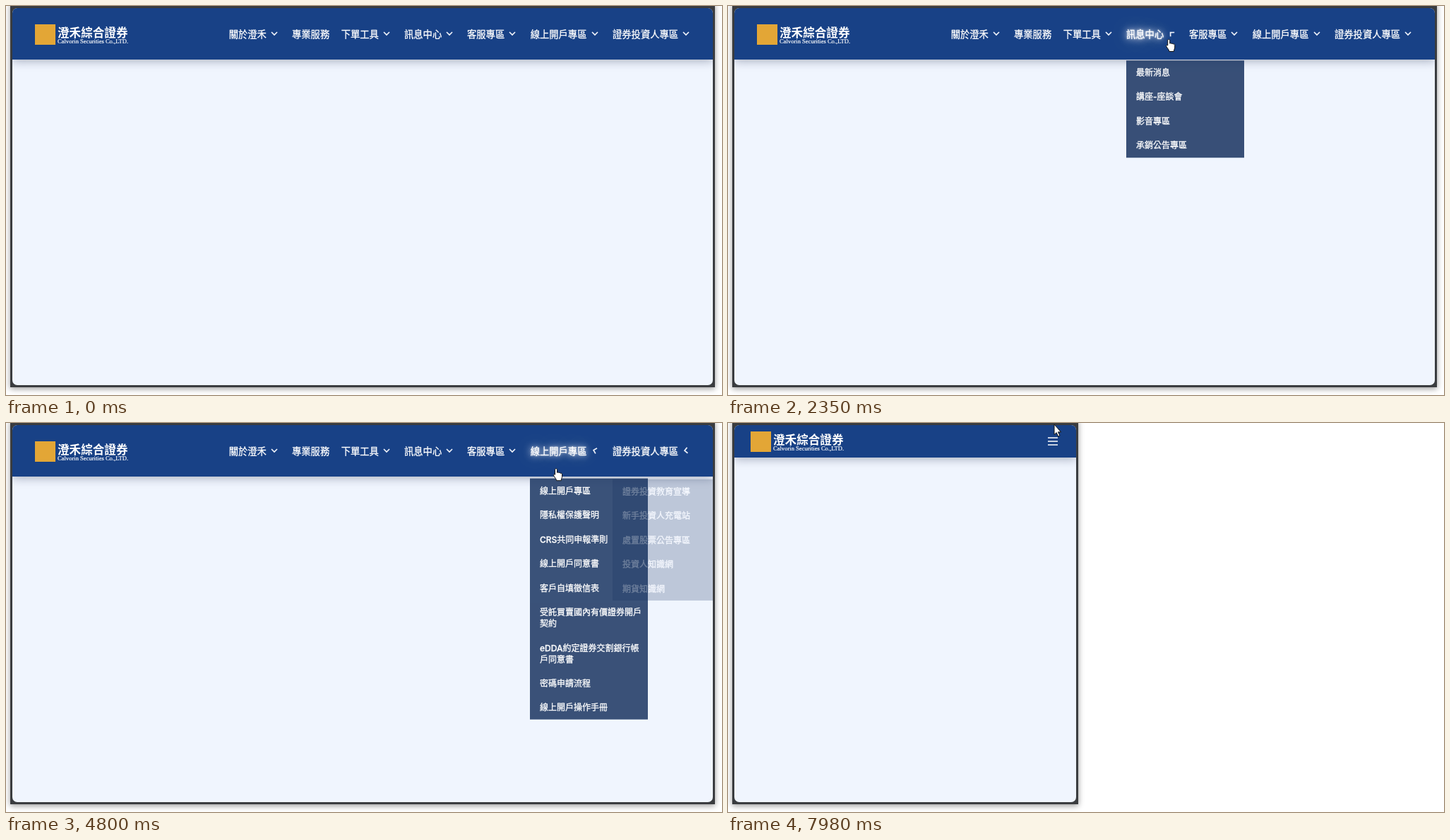
Write an HTML page that moves like this. It is 1014 by 552 pixels and loops after 8 s.

```html
<!DOCTYPE html>
<html lang="zh-Hant">
<head>
<meta charset="utf-8">
<title>導覽列</title>
<style>
html, body { margin: 0; width: 100%; height: 100%; overflow: hidden; background: #fff; }
body { position: relative; color: #fff; font-family: Inter, "Noto Sans CJK TC", "Noto Sans CJK JP", "Noto Sans CJK", sans-serif; }
#frame { position: absolute; left: 6px; top: -4px; height: 545px; background: #3a3c3f; box-shadow: 0 2px 8px rgba(0,0,0,.42); }
#page { position: absolute; left: 3px; right: 3px; top: 7px; height: 535px; border-radius: 7px; overflow: hidden; background: #f0f5fe; }
header { position: absolute; left: 0; right: 0; top: 0; height: 73px; background: #184186; box-shadow: 0 3px 12px rgba(20,30,60,.3); }
#logo { position: absolute; left: 32px; top: 23px; white-space: nowrap; }
#logo i { position: absolute; width: 29px; height: 29px; background: #e3a636; }
#logo b { position: absolute; left: 32px; top: 2px; font-size: 16.6px; line-height: 20px; font-weight: 900; }
#logo span { position: absolute; left: 32px; top: 18px; font: 8.56px/12px "Liberation Serif", serif; -webkit-text-stroke: .2px #fff; }
nav { position: absolute; right: 0; top: 0; width: 992px; height: 73px; }
.top { position: absolute; top: 27px; font-size: 13.3px; line-height: 20px; font-weight: 500; white-space: nowrap; -webkit-text-stroke: .3px #fff; }
.glow { text-shadow:
  0 0 3px rgb(255 255 255 / calc(.8 * var(--g, 0))),
  0 0 8px rgb(255 255 255 / calc(.9 * var(--g, 0))),
  0 0 14px rgb(255 255 255 / calc(.8 * var(--g, 0))),
  0 0 36px rgb(255 255 255 / calc(.6 * var(--g, 0))); }
.chev { position: absolute; top: 30px; width: 12px; height: 12px; }
.chev path { fill: none; stroke: #eef2fa; stroke-width: 1.7; }
.menu { position: absolute; top: 73px; width: 167px; background: rgba(24,51,96,.85); }
.row { padding: 9.93px 0 8.53px 14px; font-size: 12px; line-height: 16px; font-weight: 500; white-space: nowrap; -webkit-text-stroke: .3px #fff;
  background: rgb(24 64 135 / calc(.55 * var(--g, 0))); }
#burger { position: absolute; right: 26px; top: 17px; width: 14px; height: 12px; }
#burger path { stroke: #fff; stroke-width: 1.7; }
#cursor { position: absolute; left: 0; top: 0; width: 1px; height: 1px; overflow: visible; }
#cursor path { stroke-linejoin: round; }
</style>
</head>
<body>
<div id="frame"><div id="page">
  <header>
    <div id="logo"><i></i><b>澄禾綜合證券</b><span>Calvorin Securities Co.,LTD.</span></div>
    <nav></nav>
    <svg id="burger" viewBox="0 0 14 12"><path d="M0 1H14M0 6H14M0 11H14"/></svg>
  </header>
</div></div>
<svg id="cursor">
  <path id="hand" fill="#fff" stroke="#111" stroke-width="1" d="M2.5 9V2C2.5 0 5.5 0 5.5 2V6.2C6.3 5.5 7.5 5.6 7.9 6.5C8.7 6 9.8 6.2 10.2 7.1C11.2 6.7 12.5 7.2 12.5 8.5V12C12.5 13.5 11.2 14.5 11.2 17.5H4.6C4.6 15.5 2 13 .6 10.3C0 9 1.4 8 2.5 9Z" transform="translate(-4 0)"/>
  <path id="arrow" fill="#fff" stroke="#111" stroke-width="1" d="M0 0V14.5L3.2 11.6L5.6 17L7.9 16L5.5 10.8H9.6Z"/>
  <path id="resize" fill="#111" stroke="#fff" stroke-width=".7" d="M-7.5 0l4-3.8v2.9h7v-2.9l4 3.8l-4 3.8v-2.9h-7v2.9z"/>
</svg>
<script>
const LOOP = 8000, FADE = 300, HEADER = 76;
const $ = id => document.getElementById(id);
const clamp = v => Math.min(1, Math.max(0, v));
const smooth = v => (v = clamp(v), v * v * (3 - 2 * v));

// label, left edge, opening time, closing time, menu rows
const items = [
  ['關於澄禾', 315.7, 270, 1560, '公司簡介 組織架構 服務據點 資通安全 隱私權政策 發言人與檢舉信箱 永續發展專區 公司治理專區 投資人專區 金融友善服務專區 機構投資人盡職治理專區 風險管理專區 防制洗錢打擊資恐專區 股務代理機構'],
  ['專業服務', 405],
  ['下單工具', 474.7, 1590, 1990, '電腦下單 手機下單 語音下單 憑證專區 軟體下載'],
  ['訊息中心', 564, 2150, 2480, '最新消息 講座-座談會 影音專區 承銷公告專區'],
  ['客服專區', 653, 2480, 2770, '常見問題 表單下載 交易時間 費用說明 開戶須知 申購專區 申訴管道 聯絡我們'],
  ['線上開戶專區', 742.7, 2780, 3360, '線上開戶專區 隱私權保護聲明 CRS共同申報準則 線上開戶同意書 客戶自填徵信表 受託買賣國內有價證券開戶|契約 eDDA約定證券交割銀行帳|戶同意書 密碼申請流程 線上開戶操作手冊'],
  ['證券投資人專區', 859, 3360, 4644, '證券投資教育宣導 新手投資人充電站 處置股票公告專區 投資人知識網 期貨知識網']
].map(([label, x, start, end, rows]) => ({ label, x, rows, spans: start ? [[start, end]] : [] }));
items[5].spans.push([4634, 5450]);

// time, x, y of the pointer tip
const path = [
  [80, 423, -20], [250, 386, 38], [500, 378, 60], [870, 381, 66], [1000, 381, 66],
  [1200, 383, 178], [1250, 383, 206], [1400, 390, 232], [1560, 465, 90], [1620, 510, 50], [1800, 530, 48],
  [1840, 530, 48], [1990, 545, 45], [2150, 566, 44], [2350, 624, 47], [2480, 655, 48],
  [2640, 700, 50], [2680, 700, 50], [2800, 745, 52], [3000, 815, 62], [3100, 830, 73], [3140, 833, 84],
  [3350, 862, 60], [3470, 900, 60], [3510, 900, 60], [3800, 925, 150], [4100, 920, 180],
  [4300, 900, 110], [4350, 900, 110], [4640, 858, 62], [4800, 779, 64], [5140, 790, 150],
  [5180, 790, 150], [5450, 905, 290], [5620, 940, 330]
];

function add(parent, tag, cls, left, html) {
  const el = document.createElement(tag);
  el.className = cls;
  if (left !== null) el.style.left = left - 9 + 'px';
  el.innerHTML = html;
  return parent.appendChild(el);
}

const nav = document.querySelector('nav');
for (const it of items) {
  it.w = it.label.length * 13.3;
  it.text = add(nav, 'div', 'top glow', it.x, it.label);
  if (!it.rows) continue;
  it.chev = add(nav, 'div', 'chev', it.x + it.w + 5,
    '<svg width="12" height="12" style="display:block"><path d="M2 4L6 8L10 4"/></svg>');
}
for (const it of items.filter(it => it.rows)) {
  it.menu = add(nav, 'div', 'menu', Math.floor(it.x), '');
  let y = HEADER;
  it.list = it.rows.split(' ').map(s => {
    const h = s.includes('|') ? 50.46 : 34.46;
    const row = { y, h, el: add(it.menu, 'div', 'row glow', null, s.replace('|', '<br>')) };
    y += h;
    return row;
  });
}

function pointer(t) {
  if (t <= path[0][0]) return path[0].slice(1);
  const i = path.findIndex(p => p[0] > t);
  if (i < 0) return path[path.length - 1].slice(1);
  const [t0, x0, y0] = path[i - 1], [t1, x1, y1] = path[i];
  const k = (t - t0) / (t1 - t0);
  return [x0 + (x1 - x0) * k, y0 + (y1 - y0) * k];
}

// Part of a recent time span that the pointer spent in a box
function share(t, from, to, x, y, w, h) {
  let n = 0;
  for (let k = 0; k < 8; k++) {
    const [px, py] = pointer(t - from + (from - to) * k / 7);
    if (px >= x && px < x + w && py >= y && py < y + h) n++;
  }
  return n / 8;
}

function drawNav(t) {
  for (const it of items) {
    it.text.style.setProperty('--g', share(t, 160, 50, it.x - 3, 20, it.w + 23, HEADER - 20));
    if (!it.menu) continue;
    const p = it.spans.reduce((s, [a, b]) => s + smooth((t - a) / FADE) - smooth((t - b) / FADE), 0);
    it.chev.style.transform = `rotate(${180 * p}deg)`;
    const alpha = clamp((p - .42) * 6);
    it.menu.style.opacity = alpha;
    it.menu.style.visibility = alpha > 0 ? 'visible' : 'hidden';
    it.menu.style.transform = `translateY(${10 * Math.pow(clamp(1 - p), 1.5)}px)`;
    for (const r of it.list)
      r.el.style.setProperty('--g', alpha && share(t, 100, 50, it.x, r.y, 167, r.h));
  }
}

function drawFrame(edge) {
  const wide = edge > 872;
  $('frame').style.width = edge - 6 + 'px';
  document.querySelector('header').style.height = (wide ? 73 : 46) + 'px';
  $('logo').style.left = (wide ? 32 : 23) + 'px';
  $('logo').style.top = (wide ? 23 : 9) + 'px';
  nav.style.display = wide ? '' : 'none';
  $('burger').style.display = wide ? 'none' : '';
}

function drawCursor(t, edge) {
  let kind = '', [x, y] = pointer(t);
  if (t >= 80 && t < 5620) kind = t < 220 || t > 5480 ? 'arrow' : 'hand';
  if (t >= 6010) {
    kind = 'resize';
    x = edge + 3;
    y = 362 - 13 * smooth((t - 6420) / 600);
  }
  if (t >= 7770) {
    const k = smooth((t - 7770) / 200);
    kind = 'arrow';
    x = 498 - 36 * k;
    y = 349 - 347 * k;
  }
  for (const id of ['hand', 'arrow', 'resize']) $(id).style.display = id === kind ? '' : 'none';
  $('cursor').style.transform = `translate(${x}px, ${y}px)`;
}

const begin = performance.now();
function draw() {
  const t = (performance.now() - begin) % LOOP;
  const edge = 1004 - 551 * smooth((t - 6420) / 600) + 42.5 * smooth((t - 7550) / 210);
  drawNav(t);
  drawFrame(edge);
  drawCursor(t, edge);
  requestAnimationFrame(draw);
}
draw();
</script>
</body>
</html>
```
